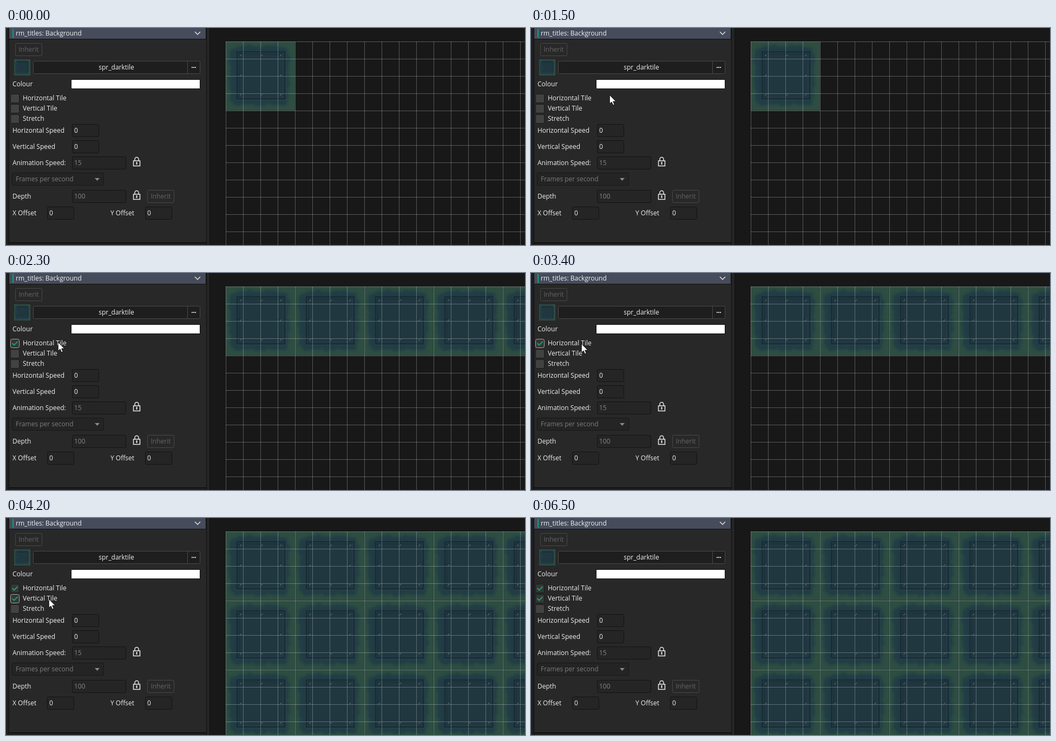
Recreate the animation shown at these times as an HTML page with a canvas. Size 959 px wide and 402 px high, loop 6600 ms.

```html
<!DOCTYPE html>
<html>
<head>
<meta charset="utf-8">
<style>
html, body { margin: 0; width: 100%; height: 100%; overflow: hidden; background: #181818; }
canvas { display: block; }
</style>
</head>
<body>
<canvas id="stage" width="959" height="402"></canvas>
<script>
const LOOP = 6600, STEP = 100;
const ctx = document.getElementById('stage').getContext('2d');

// Pointer path: time, x, y, easing towards this point
const linear = k => k;
const easeIn = k => k ** 1.6;
const easeOut = k => 1 - (1 - k) ** 1.4;
const smooth = k => k * k * (3 - 2 * k);
const path = [
  [100, 363, 258, linear], [400, 318, 196, linear], [700, 265, 140, linear],
  [900, 217, 126, linear], [1400, 155, 123, easeOut], [2200, 96, 128, easeOut],
  [3200, 96, 128, linear], [4000, 79, 150, smooth], [5100, 79, 150, linear],
  [5800, 282, 204, easeIn], [6100, 326, 276, linear], [6400, 358, 390, linear]
];

function pointerAt(t) {
  const i = path.findIndex(p => p[0] >= t);
  if (i < 0 || t < path[0][0]) return null;
  if (i === 0) return { x: path[0][1], y: path[0][2] };
  const [t0, x0, y0] = path[i - 1], [t1, x1, y1, ease] = path[i];
  const k = ease((t - t0) / (t1 - t0));
  return { x: Math.round(x0 + (x1 - x0) * k), y: Math.round(y0 + (y1 - y0) * k) };
}

function fill(g, color, x, y, w, h) {
  g.fillStyle = color;
  g.fillRect(x, y, w, h);
}

function line(g, color, width, points, close) {
  g.strokeStyle = color;
  g.lineWidth = width;
  g.beginPath();
  points.forEach(([x, y]) => g.lineTo(x, y));
  if (close) g.closePath();
  g.stroke();
}

function text(str, x, y, color = '#f0f0f0', align = 'left') {
  ctx.font = '12px "Open Sans", "Noto Sans", sans-serif';
  ctx.textAlign = align;
  ctx.fillStyle = color;
  ctx.fillText(str, x, y + 4);
}

function box(x, y, w, h, back, border, radius = 2) {
  ctx.beginPath();
  ctx.roundRect(x + .5, y + .5, w - 1, h - 1, radius);
  ctx.fillStyle = back;
  ctx.fill();
  ctx.strokeStyle = border;
  ctx.lineWidth = 1;
  ctx.stroke();
}

function makeTile() {
  const canvas = document.createElement('canvas');
  canvas.width = canvas.height = 128;
  const g = canvas.getContext('2d');
  fill(g, '#2f4e42', 0, 0, 128, 128);

  // Mossy rim with an uneven inner edge
  const blob = (size, color, blur) => {
    g.filter = `blur(${blur}px)`;
    g.fillStyle = color;
    g.beginPath();
    for (let a = 0; a < 6.283; a += .04) {
      const c = Math.cos(a), s = Math.sin(a);
      const r = size / (c ** 8 + s ** 8) ** .125 + 1.6 * Math.sin(a * 9) + 1.3 * Math.sin(a * 23 + 1);
      g.lineTo(62 + r * c, 63 + r * s);
    }
    g.fill();
  };
  blob(58, '#2a4a43', 2);
  blob(54, '#233f46', 1.5);
  blob(49, '#213b44', 3);
  g.filter = 'none';

  // Recessed plate
  fill(g, '#203740', 20, 18, 91, 90);
  g.filter = 'blur(.6px)';
  line(g, '#182b34', 2, [[21, 107], [21, 19], [110, 19]]);
  line(g, '#192d35', 2, [[21, 106], [109, 106], [109, 19]]);
  line(g, '#2b474d', 1, [[20, 109], [112, 109], [112, 18]]);
  line(g, '#1b3039', 1, [[25, 103], [25, 23], [106, 23]]);
  line(g, '#274148', 1, [[25, 103], [106, 103], [106, 23]]);
  for (const y of [25, 62, 98]) for (const x of [27, 66, 101]) {
    if (x === 66 && y === 62) continue;
    line(g, '#162931', 2, [[x - 2, y + 1], [x + 1, y - 2]]);
    line(g, '#4b6968', 1.6, [[x - 1, y + 2], [x + 2, y - 1]]);
  }
  g.filter = 'none';
  line(g, 'rgba(20,40,40,.35)', 1, [[.5, .5], [127.5, .5], [127.5, 127.5], [.5, 127.5]], true);
  return canvas;
}
const tile = makeTile();

function drawRoom(columns, rows) {
  fill(ctx, '#181818', 377, 0, 582, 402);
  for (let c = 0; c < columns; c++)
    for (let r = 0; r < rows; r++) ctx.drawImage(tile, 406 + 128 * c, 25 + 128 * r);
  const grid = 'rgba(255,255,255,.27)';
  for (let x = 406; x < 959; x += 32) fill(ctx, grid, x, 25, 1, 377);
  for (let y = 25; y < 402; y += 32) fill(ctx, grid, 406, y, 553, 1);
}

function field(x, y, w, value, color) {
  box(x, y - 12, w, 24, '#252525', '#131313');
  text(value, x + 4, y, color);
}

function inherit(x, y) {
  box(x, y - 12, 50, 24, '#282828', '#484848');
  text('Inherit', x + 25, y, '#656565', 'center');
}

function lock(x, y) {
  ctx.strokeStyle = '#e8e8e8';
  ctx.lineWidth = 1.5;
  ctx.strokeRect(x - 5.5, y - 2, 12, 9.5);
  ctx.beginPath();
  ctx.moveTo(x - 3, y - 2);
  ctx.lineTo(x - 3, y - 5);
  ctx.arc(x + .5, y - 5, 3.5, Math.PI, 0);
  ctx.lineTo(x + 4, y - 2);
  ctx.stroke();
  fill(ctx, '#e8e8e8', x - .5, y, 2, 5);
}

function checkbox(label, y, checked, hover) {
  box(8, y - 8, 17, 17, checked ? '#363636' : '#424242', hover ? '#a8a8a8' : '#1a1a1a', hover ? 3 : 2);
  if (checked) line(ctx, '#12a06c', 2, [[11.5, y], [15, y + 3.5], [21.5, y - 3]]);
  text(label, 31, y);
}

function drawPanel(pointer, horizontal, vertical) {
  fill(ctx, '#1e1e1e', 0, 0, 377, 402);
  fill(ctx, '#111111', 5, 0, 366, 402);
  fill(ctx, '#282828', 6, 21, 364, 376);
  fill(ctx, '#202020', 6, 399, 364, 3);
  fill(ctx, '#252525', 371, 0, 5, 402);
  fill(ctx, '#101010', 376, 0, 1, 402);

  fill(ctx, '#464c5b', 6, 0, 363, 20);
  fill(ctx, '#12a070', 12, 2, 2, 16);
  text('rm_titles: Background', 18, 10);
  line(ctx, '#e0e0e0', 1.5, [[349, 7], [354, 12], [359, 7]]);

  inherit(17, 40);
  ctx.drawImage(tile, 15, 58, 30, 30);
  box(50, 61, 309, 24, '#1e1e1e', '#484848');
  fill(ctx, '#484848', 335, 62, 1, 22);
  text('spr_darktile', 204, 73, '#f0f0f0', 'center');
  for (let i = 0; i < 3; i++) fill(ctx, '#d8d8d8', 343 + 3 * i, 72, 2, 2);

  text('Colour', 12, 104);
  fill(ctx, '#111111', 120, 95, 239, 18);
  fill(ctx, '#ffffff', 121, 96, 237, 16);

  const over = y => pointer && pointer.x < 113 && Math.abs(pointer.y - y) < 9.5;
  checkbox('Horizontal Tile', 130, horizontal, over(130));
  checkbox('Vertical Tile', 149, vertical, over(149));
  checkbox('Stretch', 168, false, false);

  text('Horizontal Speed', 12, 190);
  field(122, 190, 50, '0');
  text('Vertical Speed', 12, 220);
  field(122, 220, 50, '0');
  text('Animation Speed:', 12, 250);
  field(122, 250, 100, '15', '#858585');
  lock(241, 248);

  box(11, 268, 170, 24, '#242424', '#171717');
  text('Frames per second', 18, 280, '#7d7d7d');
  ctx.fillStyle = '#8a8a8a';
  ctx.beginPath();
  ctx.moveTo(164, 278);
  ctx.lineTo(173, 278);
  ctx.lineTo(168.5, 283);
  ctx.fill();

  text('Depth', 12, 312);
  field(122, 312, 100, '100', '#858585');
  lock(241, 310);
  inherit(261, 312);
  text('X Offset', 12, 343);
  field(76, 343, 50, '0');
  text('Y Offset', 193, 343);
  field(257, 343, 50, '0');
}

const arrow = new Path2D('M0 0V16L3.7 12.6L6.3 18.5L8.8 17.4L6.3 11.7H11.5Z');
function drawPointer({ x, y }) {
  ctx.save();
  ctx.translate(x + .3, y + .3);
  ctx.fillStyle = '#ffffff';
  ctx.fill(arrow);
  ctx.strokeStyle = '#000000';
  ctx.lineWidth = .8;
  ctx.stroke(arrow);
  ctx.restore();
}

function render(now) {
  const t = Math.floor(now % LOOP / STEP) * STEP;
  const horizontal = t >= 2300, vertical = t >= 4200;
  const pointer = pointerAt(t);
  drawRoom(horizontal ? 5 : 1, vertical ? 3 : 1);
  drawPanel(pointer, horizontal, vertical);
  if (pointer) drawPointer(pointer);
}

const start = performance.now();
function frame() {
  render(performance.now() - start);
  requestAnimationFrame(frame);
}
frame();
</script>
</body>
</html>
```
